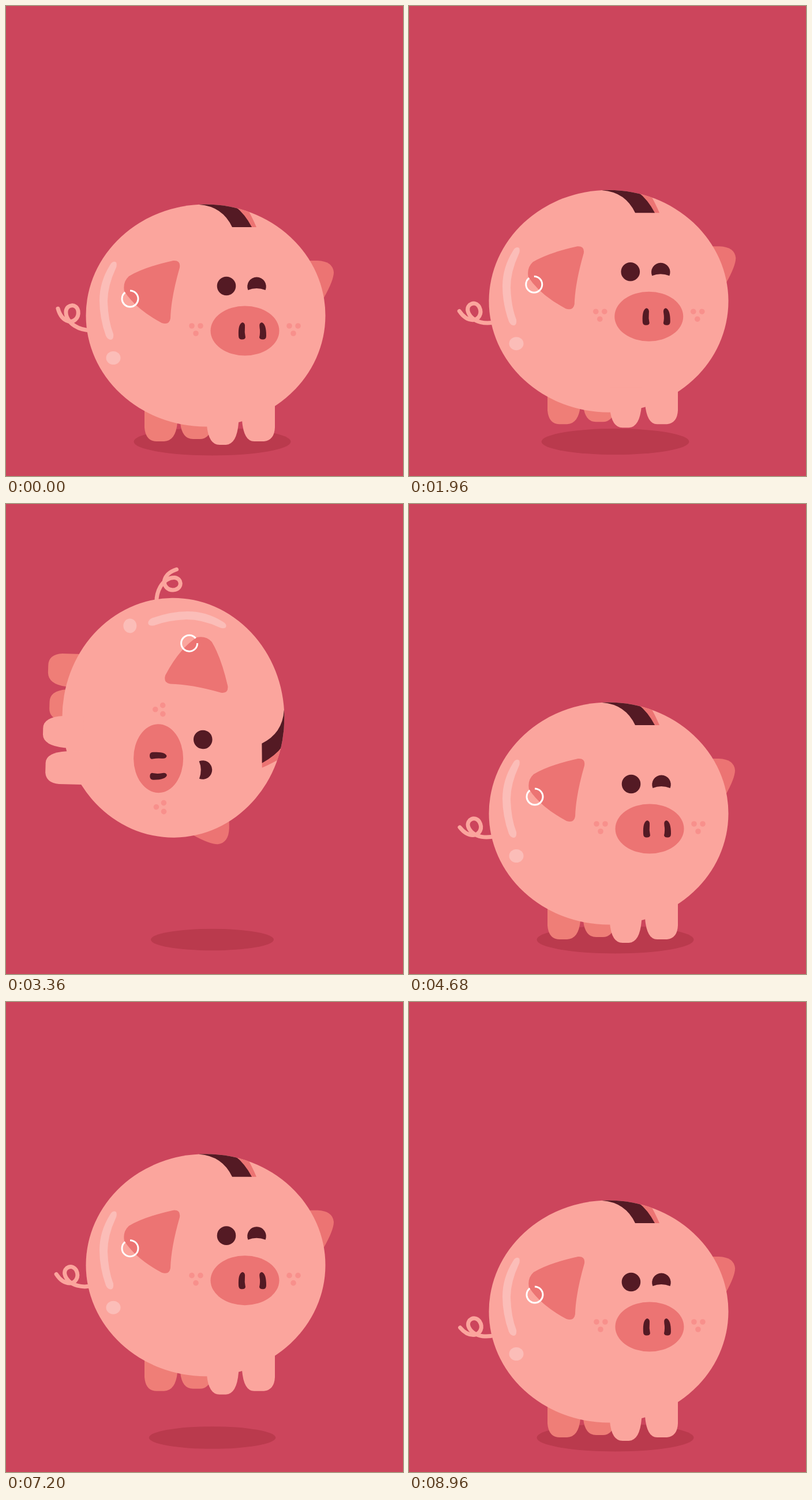
These frames come from a looping animation (688x814 px, 9000 ms). An HTML page:

```html
<!DOCTYPE html>
<html lang="en">
<head>
<meta charset="utf-8">
<title>Piggy bank</title>
<style>
  html, body { margin: 0; width: 100%; height: 100%; overflow: hidden; background: #cc455c; }
  svg { display: block; width: 100%; height: 100%; }
  .skin { fill: #fba59d; }
  .far { fill: #ef7e77; }
  .blush { fill: #ec7473; }
  .dark { fill: #541a24; }
  .shine { fill: #fbbdb8; }
  .freckle { fill: #f8908c; }
  .line { fill: none; stroke-linecap: round; stroke-linejoin: round; }
</style>
</head>
<body>
<svg viewBox="0 0 688 814">
  <defs>
    <clipPath id="bodyClip"><ellipse cx="346" cy="536" rx="207.5" ry="192.5"/></clipPath>
  </defs>
  <rect width="688" height="814" fill="#cc455c"/>
  <ellipse id="shadow" cx="357.5" cy="754.5" fill="#ba3a4d"/>

  <g id="pig">
    <path id="tail" class="line" stroke="#fba59d" stroke-width="7"
      d="M165 560C125 568 102 546 104 528C106 516 122 515 125 528C127 542 116 548 108 546C98 543 93 535 90 524"/>
    <path id="earBack" class="blush" d="M515 441H540Q566 442 568 461Q568 475 551 505L525 505Z"/>
    <g id="legsBack" class="far">
      <path d="M240 680V730Q242 754 261 754H274Q294 753 297 722V680Z"/>
      <path d="M302 700V722Q305 750 324 750H336Q352 750 358 728V700Z"/>
    </g>
    <ellipse class="skin" cx="346" cy="536" rx="207.5" ry="192.5"/>
    <g id="legsFront" class="skin">
      <path d="M348 690V726Q351 760 370 760H381Q400 759 403 722V690Z"/>
      <path d="M409 660V718Q412 754 430 754H447Q465 752 466 730V660Z"/>
    </g>

    <g clip-path="url(#bodyClip)">
      <path class="blush" d="M395 340H412Q426 364 434 383H420Z"/>
      <path class="dark" d="M335 340H390L397 347Q414 360 426 383H392Q375 347 335 344Z"/>
    </g>

    <path class="shine" d="M180 449Q185 440 191 444Q193 449 190 455Q176 485 176 512Q177 545 186 568Q187 577 182 578Q176 578 173 571Q162 540 162 510Q162 478 180 449Z"/>
    <ellipse class="shine" cx="186" cy="609.5" rx="12.5" ry="11.5"/>

    <g id="face">
      <path class="blush" d="M213 468Q240 452 290 441Q303 440 301 453Q286 505 285 541Q283 553 270 549Q225 525 205 494Q202 478 213 468Z"/>
      <circle class="line" cx="215" cy="507" r="14" stroke="#fff" stroke-width="3" pathLength="360"
        stroke-dasharray="322 38" transform="rotate(-90 215 507)" style="stroke-linecap:butt"/>
      <circle class="dark" cx="382" cy="485" r="16.3"/>
      <path class="dark" d="M419.4 492A16.3 16.3 0 1 1 449.6 492Q434 486 419.4 492Z"/>
      <ellipse class="blush" cx="414" cy="562.5" rx="59.5" ry="43"/>
      <path class="dark" d="M410 548Q415 549 414 557Q413 565 415 574Q414 578 408 577.5Q403 577 403 571Q402 550 410 548Z"/>
      <path class="dark" d="M443 548Q438 549 439.5 557Q441 565 439 574Q440 578 446 577.5Q451 577 451 571Q451 550 443 548Z"/>
      <g id="freckles" class="freckle"></g>
    </g>
  </g>
</svg>
<script>
  const LOOP = 9000, CYCLE = 4404;
  const $ = id => document.getElementById(id);
  const clamp = x => Math.min(1, Math.max(0, x));
  const wave = x => (1 - Math.cos(2 * Math.PI * x)) / 2;
  const move = (id, transform) => $(id).setAttribute('transform', transform);

  $('freckles').innerHTML = [322, 491].map(x =>
    [[0, 554], [15, 554], [7, 567]].map(([dx, y]) => `<circle cx="${x + dx}" cy="${y}" r="4.8"/>`).join('')
  ).join('');

  const hop = (t, start) => 61 * wave(clamp((t - start) / 400));

  // Backflip: airborne 2660 to 3520 ms, spinning from 2880 ms.
  const leap = t => 150 * Math.max(0, 1 - ((t - 3090) / 430) ** 2);
  const spin = t => clamp((t - 2880) / 640);

  const wag = t => 30 * (t < 3328 ? wave(t / 416) : wave((t - 3328) / ((CYCLE - 3328) / 3)));

  function draw(now) {
    const t = now % CYCLE;
    const hops = hop(t, 640) + hop(t, 1873);
    const turn = spin(t);
    const rise = hops + leap(t);
    const sway = 3 * wave(now / 720);
    const tuck = 1.5 * Math.sin(Math.PI * turn) - 5 * clamp(hops / 24);
    const legs = `translate(0 ${tuck}) rotate(${3 * Math.sin(Math.PI * turn)} 346 536)`;

    move('pig', `translate(0 ${-rise}) rotate(${-360 * turn} 356 470)`);
    move('tail', `rotate(${-wag(t)} 179 547)`);
    move('face', `translate(${sway} 0)`);
    move('earBack', `translate(${-sway} 0)`);
    move('legsBack', legs);
    move('legsFront', legs);

    const size = 1 - 0.0024 * rise;
    $('shadow').setAttribute('rx', 136 * size);
    $('shadow').setAttribute('ry', 24 * size);
  }

  const start = performance.now();
  function tick() {
    draw((performance.now() - start) % LOOP);
    requestAnimationFrame(tick);
  }
  tick();
</script>
</body>
</html>
```
